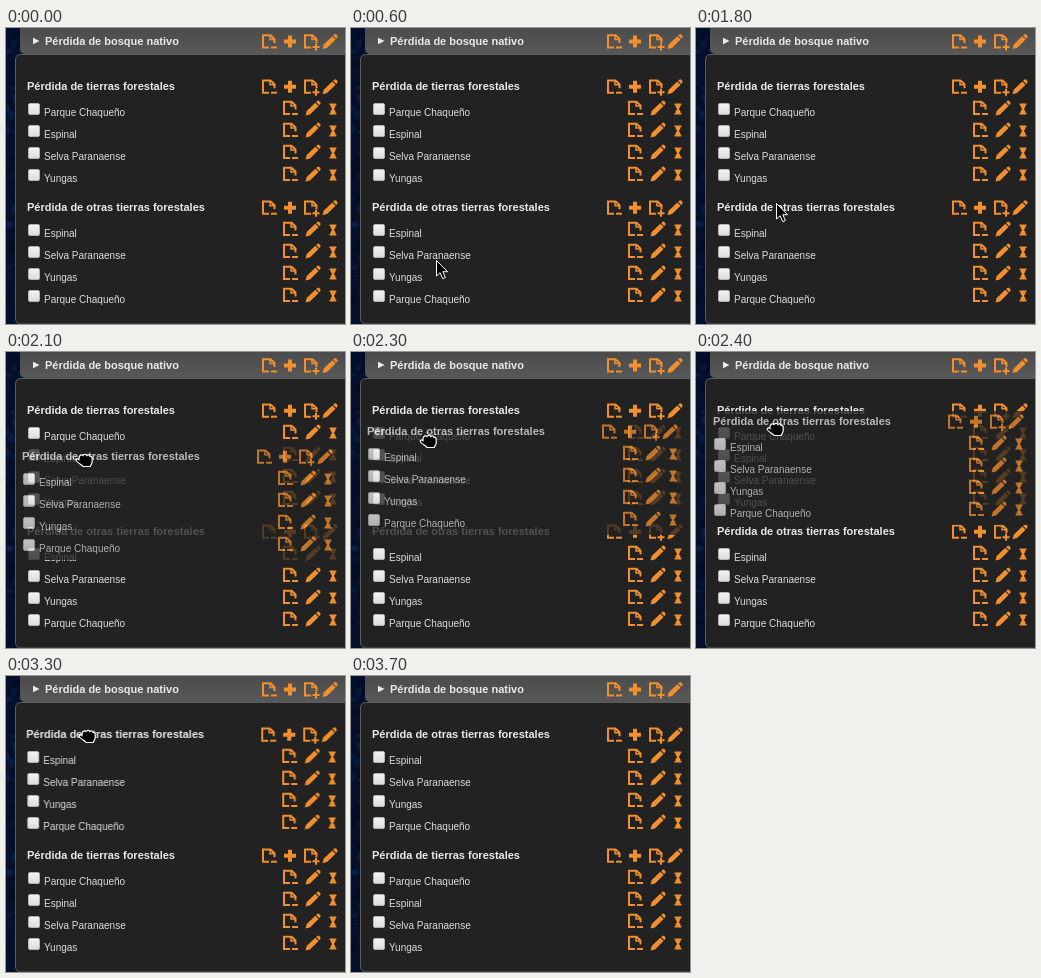
Write an HTML page that moves like this. It is 339 px wide and 296 px high and loops after 4700 ms.

```html
<!DOCTYPE html>
<html lang="es">
<head>
<meta charset="utf-8">
<title>Capas</title>
<style>
html, body { margin: 0; width: 100%; height: 100%; overflow: hidden; background: #222; }
svg { display: block; width: 100%; height: 100%; }
text { font-family: "Liberation Sans", Arial, sans-serif; font-size: 10px; fill: #dcdcdc; white-space: pre; }
.head { font-size: 11px; font-weight: bold; fill: #e9e9e9; }
</style>
</head>
<body>
<svg id="stage" viewBox="0 0 339 296">
  <defs>
    <linearGradient id="bar" x2="0" y2="1">
      <stop offset="0" stop-color="#4b4b4b"/><stop offset="1" stop-color="#585858"/>
    </linearGradient>
    <linearGradient id="box" x2="0" y2="1">
      <stop offset="0" stop-color="#f4f4f4"/><stop offset="1" stop-color="#dcdcdc"/>
    </linearGradient>
    <g id="page" fill="none" stroke="#f28f2e" stroke-width="2">
      <path d="M5.5 1.5V-2.5L1.5 -6.2H-6V6H0"/>
      <path d="M1 -6V-2H5.5" stroke-width="1.5"/>
    </g>
    <g id="minus"><use href="#page"/><path d="M2 5h6v2h-6z" fill="#f28f2e"/></g>
    <g id="more"><use href="#page"/><path d="M4 2h2v2.5h2.5v2h-2.5v2.5h-2v-2.5h-2.5v-2h2.5z" fill="#f28f2e"/></g>
    <path id="plus" fill="#f28f2e" d="M-2 -6h4v4h4v4h-4v4h-4v-4h-4v-4h4z"/>
    <path id="pencil" fill="#f28f2e" d="M-7.5 7.5L-6.3 3L2.3 -5.2L5.6 -1.9L-3 6.4ZM3.1 -6L4.6 -7.3Q5.4 -7.8 6.2 -7.1L7.4 -5.8Q8 -5 7.4 -4.2L6.3 -2.8Z"/>
    <path id="glass" fill="#f28f2e" d="M-3.5 -5.5h7v1.6h-.8Q2.6 -1.5 .9 0Q2.6 1.5 2.7 3.9h.8v1.6h-7v-1.6h.8Q-2.6 1.5 -.9 0Q-2.6 -1.5 -2.7 -3.9h-.8z"/>
  </defs>
  <rect width="339" height="296" fill="#04102b"/>
  <g id="sea"></g>
  <path d="M14 0H339V26H20Q14 26 14 20Z" fill="url(#bar)"/>
  <path d="M27 9.8L33.5 13L27 16.2Z" fill="#eee"/>
  <text class="head" x="39" y="17">Pérdida de bosque nativo</text>
  <g id="tools"></g>
  <path d="M345 26.5H15Q9.5 26.5 9.5 32V290Q9.5 296 15 296H345Z" fill="#222" stroke="#5c5c5c"/>
  <g id="land"></g>
  <g id="other"></g>
  <g id="drag" opacity=".76"></g>
  <path id="arrow" d="M.5 .5V16L4.1 12.7L6.8 18.7L9.4 17.5L6.8 11.7H11.5Z" fill="#000" stroke="#fff" stroke-linejoin="round"/>
  <path id="fist" d="M4 5.5C3.8 2 7 1 8 2.5C9 .8 11.5 1 12 2.5C13 1.3 15 2 15 3.5C16.4 3 17.4 4 17.2 6V9C17 11 15.5 12 15.2 13.5H8C7 12 3.5 10.5 1.5 8C.5 6.5 2.5 5.2 4 6.5Z" fill="#000" stroke="#fff" stroke-width="1.2"/>
</svg>
<script>
const LOOP = 4700, STEP = 100, TOP = 58, LOW = 179;
const $ = id => document.getElementById(id);
const icon = (name, x, y) => `<use href="#${name}" x="${x}" y="${y}"/>`;
const tools = y => icon('minus', 263, y) + icon('plus', 284, y) + icon('more', 305, y) + icon('pencil', 324, y);

function row(name, y) {
  return `<rect x="22.5" y="${y + 17.5}" width="11" height="11" rx="1.5" fill="url(#box)" stroke="#b4b4b4"/>` +
    `<text x="38" y="${y + 30}">${name}</text>` +
    icon('minus', 284, y + 22) + icon('pencil', 307, y + 22) + icon('glass', 327, y + 23);
}

function group(title, names) {
  return `<text class="head" x="21" y="4">${title}</text>` + tools(0.7) +
    names.map((n, i) => row(n, i * 22)).join('');
}

const land = group('Pérdida de tierras forestales', ['Parque Chaqueño', 'Espinal', 'Selva Paranaense', 'Yungas']);
const other = group('Pérdida de otras tierras forestales', ['Espinal', 'Selva Paranaense', 'Yungas', 'Parque Chaqueño']);
$('tools').innerHTML = tools(13.5);
$('land').innerHTML = land;
$('other').innerHTML = other;
$('drag').innerHTML = '<rect x="21" y="-10" width="318" height="114" fill="#222"/>' + other;

// Faint mottling of the map beside the panel
let seed = 7;
const rnd = () => (seed = seed * 16807 % 2147483647) / 2147483647;
let sea = '';
for (let i = 0; i < 60; i++) {
  const fill = rnd() < 0.5 ? '#0d2a5c' : '#020818';
  sea += `<ellipse cx="${rnd() * 14}" cy="${rnd() * 296}" rx="${1 + rnd() * 3}" ry="${1 + rnd() * 4}" fill="${fill}" opacity=".4"/>`;
}
$('sea').innerHTML = sea;

// time, pointer, pointer x, pointer y, dragged group x and y
const poses = [
  [0],
  [600, 'arrow', 85, 232],
  [700, 'arrow', 81, 219],
  [800, 'arrow', 74, 200],
  [900, 'arrow', 70, 181],
  [1000, 'arrow', 73, 168],
  [1100, 'arrow', 77, 173],
  [1400, 'arrow', 79, 174],
  [1600, 'arrow', 79, 175],
  [1800, 'arrow', 80, 175],
  [1900, 'fist', 72, 157, -4, 156],
  [2000, 'fist', 70, 130, -5, 130],
  [2100, 'fist', 69, 101, -5, 104],
  [2200, 'fist', 68, 92, -5, 91],
  [2300, 'fist', 68, 82, -5, 79],
  [2400, 'fist', 70, 70, -4, 69],
  [2500, 'fist', 73, 59, -1, 61],
  [2600, 'fist', 74, 53, 1, 58],
  [3300, 'fist', 72, 53, -1, 58],
  [3400, 'fist', 69, 53, -4, 58],
  [3500, 'fist', 68, 53, -5, 58],
  [3600, 'arrow', 76, 55],
  [3700]
];

function place(id, x, y) {
  const el = $(id), shown = x !== undefined;
  el.style.display = shown ? '' : 'none';
  if (shown) el.setAttribute('transform', `translate(${x} ${y})`);
}

function draw(ms) {
  const t = Math.floor(ms % LOOP / STEP) * STEP;
  const [, pointer, px, py, dx, dy] = poses.filter(p => p[0] <= t).pop();
  const swapped = t >= 2500;
  place('land', 0, swapped ? LOW : TOP);
  place('other', 0, swapped ? TOP : LOW);
  place('drag', dx, dy);
  for (const id of ['arrow', 'fist']) place(id, id === pointer ? px : undefined, py);
}

const start = performance.now();
function tick() {
  draw(performance.now() - start);
  requestAnimationFrame(tick);
}
tick();
</script>
</body>
</html>
```
